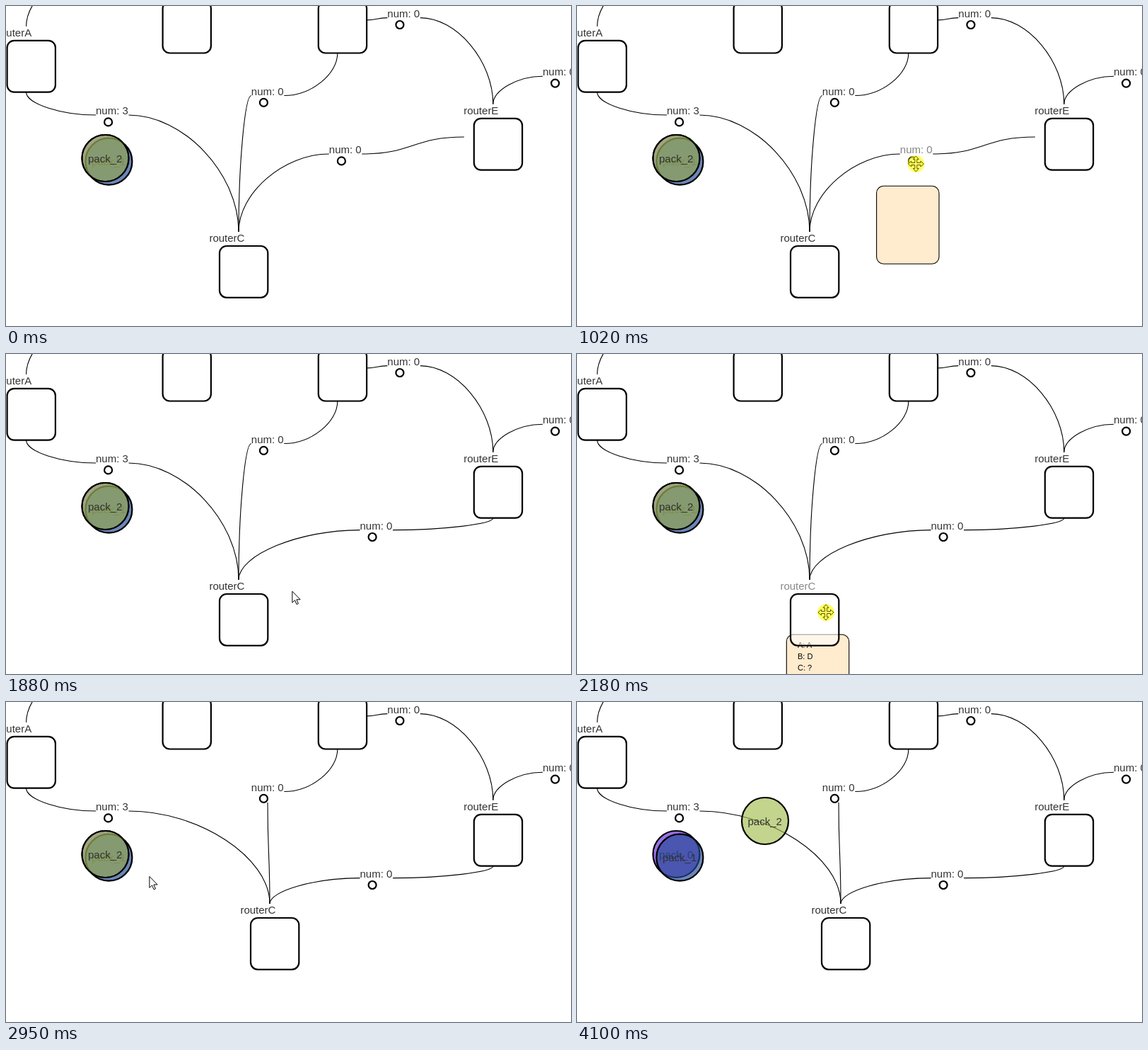
Animation, 799 px wide and 452 px high, one loop 4650 ms. Source, as an HTML page:

```html
<!DOCTYPE html>
<html lang="en">
<head>
<meta charset="utf-8">
<title>Router network</title>
<style>
  html, body { margin: 0; width: 100%; height: 100%; overflow: hidden; background: #fff; }
  svg { display: block; width: 799px; height: 452px; }
  text { font: 15px "Liberation Sans", Arial, sans-serif; fill: #333; }
  .row { font-size: 11px; fill: #000; }
  .link { fill: none; stroke: #000; stroke-width: 1.1; }
  .node, .ring, .pack { stroke: #000; stroke-width: 2.2; }
  .node, .ring { fill: #fff; }
  .panel { fill: #ffebcd; stroke: #000; stroke-width: 1.1; }
</style>
</head>
<body>
<svg id="stage" viewBox="0 0 799 452" xmlns="http://www.w3.org/2000/svg"></svg>
<script>
const LOOP = 4650;
const stage = document.getElementById('stage');

// Bursts of activity: start, end, number of steps
const BURSTS = [
  [130, 620, 7], [700, 850, 3], [1020, 1490, 7], [1570, 2030, 7], [2100, 2560, 7],
  [2640, 3100, 7], [3180, 3390, 4], [3490, 3490, 1], [3640, 4100, 7]
];

// Pointer path: time, x, y
const PATH = [
  [130, 656, 378], [620, 484, 226], [700, 479.3, 223], [1020, 479.3, 223],
  [1180, 505, 228], [1410, 523, 262.6], [1490, 523, 262.6], [2030, 358, 364],
  [2170, 352, 365], [2180, 352, 365], [2480, 396, 331], [2490, 396, 331],
  [2560, 386, 331], [3090, 135, 215], [3150, 135, 215], [3320, 244, 180],
  [3450, 260.5, 168], [3560, 260.5, 168], [4100, 830, 482]
];

// Mouse button: press, release, then the time span of the drag itself
const PRESS = {
  ring: { down: 910, up: 1480, from: 1020, to: 1490 },
  router: { down: 2060, up: 2545, from: 2180, to: 2490 },
  pack: { down: 3060, up: 3480, from: 3150, to: 3480 }
};

const ROWS = ['A: A', 'B: D', 'C: ?', 'D: D', 'E: E', 'F: E'];
const ARROW = 'M0 0V16L3.7 12.5 6.2 18.4 8.6 17.4 6.1 11.6H11.3Z';
const MOVE = 'M0-11L4-6.5H1.5V-1.5H6.5V-4L11 0 6.5 4V1.5H1.5V6.5H4L0 11-4 6.5H-1.5V1.5H-6.5V4L-11 0-6.5-4V-1.5H-1.5V-6.5H-4Z';

const clamp = (v, a, b) => Math.min(b, Math.max(a, v));
const ramp = (t, a, b) => clamp((t - a) / (b - a), 0, 1);
const within = (t, a, b) => t >= a && t < b;

function snap(t) {
  let last = 0;
  for (const [a, b, n] of BURSTS) {
    if (t < a) break;
    const gap = (b - a) / (n - 1) || 1;
    last = a + gap * Math.min(n - 1, Math.floor((t - a) / gap + 1e-6));
  }
  return last;
}

function pointer(t) {
  let i = 1;
  while (i < PATH.length - 1 && PATH[i][0] < t) i++;
  const [a, x0, y0] = PATH[i - 1], [b, x1, y1] = PATH[i];
  const k = ramp(t, a, b);
  return { x: x0 + (x1 - x0) * k, y: y0 + (y1 - y0) * k };
}

function dragged(t, { from, to }) {
  const p = pointer(clamp(t, from, to)), q = pointer(from);
  return { x: p.x - q.x, y: p.y - q.y };
}

// Fill fades to a tenth while held
const fade = (t, { down, up }) =>
  1 - 0.9 * (ramp(t, down, down + 250) - ramp(t, up, up + 250));

const router = (name, x, y, alpha = 1) => ({
  name, alpha, x, y, left: x, right: x + 82, top: y, bottom: y + 93, cx: x + 41, cy: y + 46.2
});

const hub = (x, cy, num = 0, alpha = 1) => ({
  num, alpha, left: x, right: x + 46.5, top: cy - 15.5, bottom: cy + 15.5, cx: x + 23.2, cy
});

const vertical = (box, top) => ({ x: box.cx, y: top ? box.top : box.bottom, up: true });
const sideways = (box, left) => ({ x: left ? box.left : box.right, y: box.cy, up: false });

function routerPort(r, h) {
  return h.cy < r.top || h.cy > r.bottom ? vertical(r, h.cy < r.top) : sideways(r, h.cx < r.cx);
}

function hubPort(h, r) {
  return r.cx < h.left || r.cx > h.right ? sideways(h, r.cx < h.left) : vertical(h, r.cy < h.cy);
}

function link(r, h) {
  const a = routerPort(r, h), b = hubPort(h, r);
  const mx = (a.x + b.x) / 2, my = (a.y + b.y) / 2;
  const ctrl = p => p.up ? `${p.x} ${my}` : `${mx} ${p.y}`;
  return `<path class="link" d="M${a.x} ${a.y}C${ctrl(a)} ${ctrl(b)} ${b.x} ${b.y}"/>`;
}

const label = (s, x, y, alpha = 1, cls = '') =>
  `<text class="${cls}" x="${x}" y="${y}" fill-opacity="${alpha}">${s}</text>`;

const drawRouter = r =>
  `<rect class="node" x="${r.x + 14}" y="${r.y + 20}" width="68.3" height="72.8" rx="10" fill-opacity="${r.alpha}"/>` +
  label(r.name, r.x - 0.6, r.y + 14, r.alpha);

const drawHub = h =>
  `<circle class="ring" cx="${h.left + 17.6}" cy="${h.cy + 9.9}" r="5.5" fill-opacity="${h.alpha}"/>` +
  label('num: ' + h.num, h.left, h.cy - 1, h.alpha);

const drawPack = (name, x, y, color, alpha = 1) =>
  `<circle class="pack" cx="${x}" cy="${y}" r="33" fill="${color}" fill-opacity="${0.66 * alpha}"/>` +
  label(name, x - 24.5, y + 5.5, alpha);

function drawPanel(t, show, hide, freeze, rows) {
  const alpha = ramp(t, show, show + 200) - ramp(t, hide, hide + 200);
  if (alpha <= 0) return '';
  const p = pointer(Math.min(t, freeze)), x = p.x - 55.7, y = p.y + 31.3;
  return `<g opacity="${alpha}"><rect class="panel" x="${x}" y="${y}" width="88.4" height="110" rx="10"/>` +
    rows.map((s, i) => label(s, x + 15.7, y + 19 + 15.8 * i, 1, 'row')).join('') + '</g>';
}

function drawPointer(t) {
  if (t < 130) return '';
  const { x, y } = pointer(t);
  const held = Object.values(PRESS).some(p => within(t, p.down, p.up));
  const over = within(t, 700, 1560) || within(t, 1940, 2630) || within(t, 2990, 3600);
  const glow = held ? '<circle r="12" fill="#ff0" fill-opacity=".6"/>' : '';
  const ink = held ? 'fill="#ffff60" stroke="#5c5c00"' : 'fill="#fff" stroke="#000"';
  return `<g transform="translate(${x} ${y})">${glow}<path d="${over ? MOVE : ARROW}" ${ink}/></g>`;
}

function scene(t) {
  const dr = dragged(t, PRESS.router), dh = dragged(t, PRESS.ring), dp = dragged(t, PRESS.pack);
  const A = router('routerA', -12.4, 28.8);
  const B = router('routerB', 207.6, -26.3);
  const C = router('routerC', 288 + dr.x, 319 + dr.y, fade(t, PRESS.router));
  const D = router('routerD', 427.8, -26.3);
  const E = router('routerE', 647.8, 138.8);
  const up = hub(127, -50), ac = hub(127, 154, 3), cd = hub(346.8, 126.5);
  const ce = hub(456.8 + dh.x, 209 + dh.y, 0, fade(t, PRESS.ring));
  const de = hub(539.3, 16.6), out = hub(759, 99.2);
  const links = [[A, up], [A, ac], [C, ac], [C, cd], [D, cd], [C, ce], [E, ce], [D, de], [E, de], [E, out]];
  return [
    ...links.map(pair => link(...pair)),
    drawPanel(t, 650, 1500, 1180, []),
    drawPanel(t, 1930, 2570, 2490, ROWS),
    ...[A, B, C, D, E].map(drawRouter),
    ...[up, ac, cd, ce, de, out].map(drawHub),
    drawPack('pack_0', 140.5, 215, '#6826dc'),
    drawPack('pack_1', 145.4, 219.7, '#214a94'),
    drawPack('pack_2', 140.5 + dp.x, 215 + dp.y, '#a5be51', fade(t, PRESS.pack)),
    drawPointer(t)
  ].join('');
}

let shown = -1;
const start = performance.now();

function tick() {
  const t = snap((performance.now() - start) % LOOP);
  if (t !== shown) stage.innerHTML = scene(shown = t);
  requestAnimationFrame(tick);
}
tick();
</script>
</body>
</html>
```
